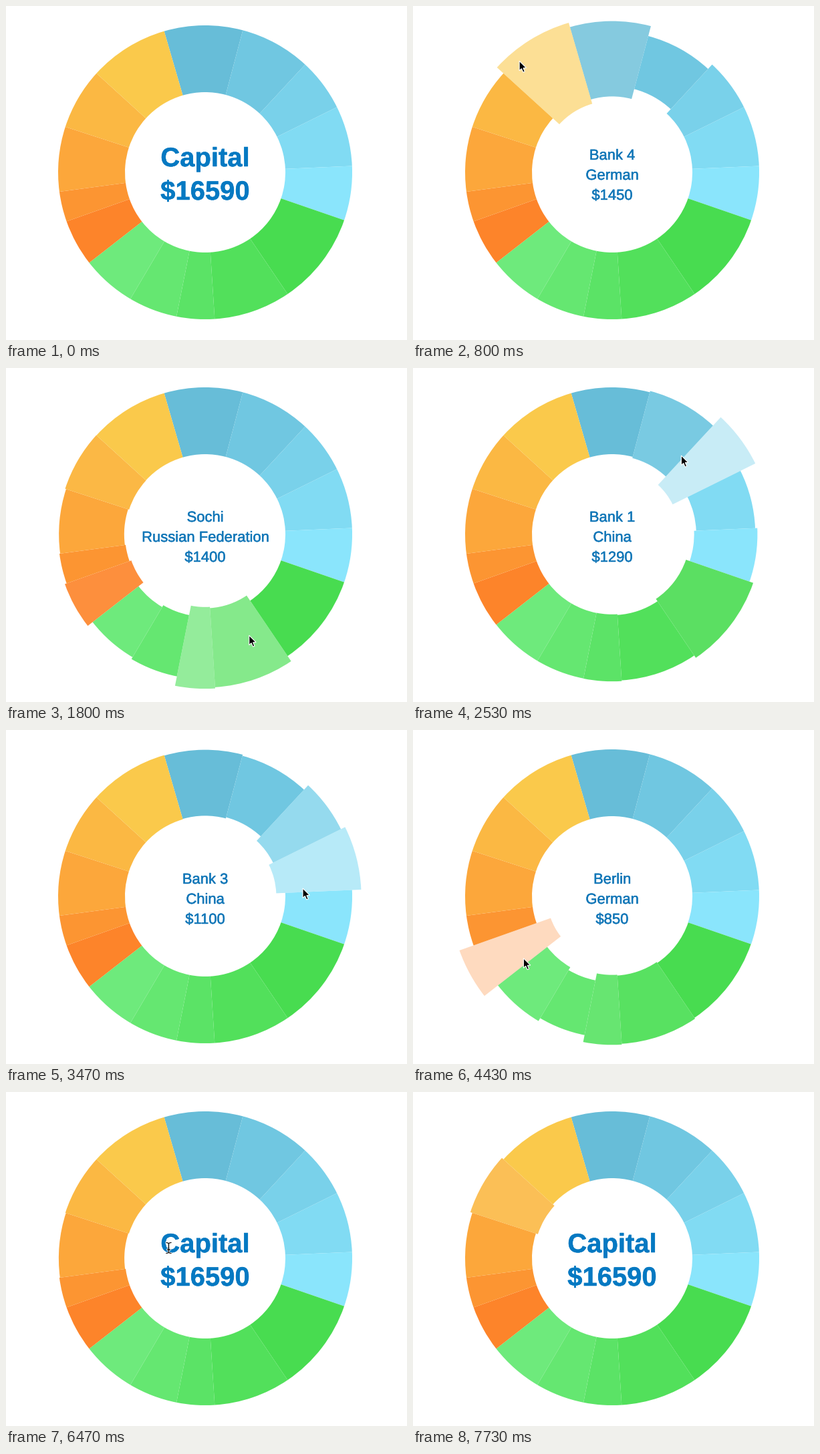
Recreate the animation shown at these times as a matplotlib script. Size 600 px wide and 500 px high, loop 7770 ms.

```python
import numpy as np
import matplotlib.pyplot as plt
from matplotlib.animation import FuncAnimation
from matplotlib.colors import to_rgb
from matplotlib.patches import Polygon, Wedge
from matplotlib.patheffects import withStroke

W, H = 600, 500
CX, CY = 298, 249
INNER, OUTER = 120, 220
GROW, FADE, TWEEN_MS = 18.5, 0.58, 1200
LOOP_MS, STEP_MS = 7770, 30
START_ANGLE = -16.2
PX = 0.72  # points per pixel at 100 dpi

# country, cities (banks fill the rest), first and last colour, values
GROUPS = [
    ("China", ["Beijing"], "#67bdd8", "#8ae5fc", [1430, 1290, 960, 1100, 990]),
    ("Russian Federation", ["Moscow", "Sochi"], "#48dc50", "#6eea7c",
     [1700, 1400, 690, 890, 990]),
    ("German", ["Berlin"], "#fd842a", "#fac94b", [850, 550, 1180, 1120, 1450]),
]

# Pointer on its way round the ring: clockwise angle from the top, and radius
ANGLE_KEYS = [
    (270, 56), (614, 14.8), (724, -16.2), (790, -39.8), (1010, -48),
    (1460, -128), (1600, -149.5), (1646, -168.8), (1761, -183.8),
    (1800, -203.2), (1960, -208), (2520, -318), (2940, -350), (3392, -296.4),
    (3460, -274.7), (4090, -168.8), (4230, -149.5), (4304, -128),
    (4430, -124.7), (4980, -110), (5850, -82), (7390, -62), (7430, -75),
]
RADIUS_KEYS = [
    (270, 372), (430, 240), (614, 180), (790, 217), (1010, 180), (1800, 165),
    (3460, 146.5), (4430, 162), (5850, 165), (6000, 60), (7120, 52),
    (7390, 242), (7430, 335),
]


def build_slices():
    slices = []
    for country, cities, first, last, values in GROUPS:
        first, last = np.array(to_rgb(first)), np.array(to_rgb(last))
        for i, value in enumerate(values):
            name = cities[i] if i < len(cities) else f"Bank {i}"
            color = first + (last - first) * i / (len(values) - 1)
            slices.append((name, country, value, color))
    return slices


SLICES = build_slices()
VALUES = [s[2] for s in SLICES]
TOTAL = sum(VALUES)
EDGES = START_ANGLE + 360 * np.cumsum([0] + VALUES) / TOTAL


def pointer(t):
    return np.interp(t, *zip(*ANGLE_KEYS)), np.interp(t, *zip(*RADIUS_KEYS))


def hovered(t):
    angle, radius = pointer(t)
    if not 105 < radius < 242:
        return None
    turned = (angle - START_ANGLE) % 360 + START_ANGLE
    return int(np.searchsorted(EDGES, turned, side="right")) - 1


def elastic(u):
    if u >= 1:
        return 1.0
    return 1 - 2 ** (-10 * u) * np.cos(2 * np.pi * u / 0.3)


def growth(tweens, t):
    for start, begin, end in reversed(tweens):
        if start <= t:
            return begin + (end - begin) * elastic((t - start) / TWEEN_MS)
    return 0.0


def build_tweens():
    tweens = [[] for _ in SLICES]
    current = None
    for t in range(270, LOOP_MS):
        target = hovered(t)
        if target == current:
            continue
        for index, end in ((current, 0), (target, GROW)):
            if index is not None:
                tweens[index].append((t, growth(tweens[index], t), end))
        current = target
    return tweens


TWEENS = build_tweens()

fig = plt.figure(figsize=(W / 100, H / 100), dpi=100, facecolor="white")
ax = fig.add_axes([0, 0, 1, 1])
ax.set_xlim(0, W)
ax.set_ylim(H, 0)
ax.axis("off")

wedges = []
for i, (_, _, _, color) in enumerate(SLICES):
    wedge = Wedge((CX, CY), OUTER, EDGES[i] - 90, EDGES[i + 1] - 90,
                  width=OUTER - INNER, facecolor=color, linewidth=0)
    wedges.append(ax.add_patch(wedge))


def label(y, size, color, weight="normal", text=""):
    return ax.text(CX, y, text, fontsize=size * PX, color=color, weight=weight,
                   family="Liberation Sans", ha="center", va="baseline",
                   parse_math=False,
                   path_effects=[withStroke(linewidth=0.35, foreground=color)])


title = [label(240, 40, "#0579c2", "bold", "Capital"),
         label(290, 40, "#0579c2", "bold", f"${TOTAL}")]
details = [label(y, 22, "#1277b8") for y in (230, 260, 290)]

ARROW = np.array([(0, 0), (0, 14.5), (3.3, 11.5), (5.7, 17), (8.2, 15.9),
                  (5.9, 10.6), (10.4, 10.4)])
arrow = ax.add_patch(Polygon(ARROW, facecolor="black", edgecolor="white",
                             linewidth=0.8, zorder=5))


def ibeam():
    gap = [(np.nan, np.nan)]
    hook = np.array([(3.5, 8), (1, 7.5), (0, 6), (0, 0)])
    parts = [(-2, 2.5), (2, 2.5)]
    for sx in (-1, 1):
        for sy in (-1, 1):
            parts += gap + [tuple(p) for p in hook * (sx, sy)]
    return np.array(parts)


BEAM = ibeam()
beam = [ax.plot([], [], color=color, linewidth=width, zorder=5)[0]
        for color, width in (("white", 2.0), ("#1a1a1a", 0.9))]


def draw_pointer(t):
    angle, radius = pointer(t)
    x = CX + radius * np.sin(np.radians(angle))
    y = CY - radius * np.cos(np.radians(angle))
    over_title = hovered(t) is None and abs(x - CX) < 67 and 205 < y < 297
    arrow.set_visible(not over_title)
    arrow.set_xy(ARROW + (x, y))
    for line in beam:
        line.set_visible(over_title)
        line.set_data(BEAM[:, 0] + x, BEAM[:, 1] + y)


def draw(frame):
    t = frame * STEP_MS + STEP_MS / 3
    for wedge, tweens in zip(wedges, TWEENS):
        d = growth(tweens, t)
        wedge.set_radius(OUTER + d)
        wedge.set_width(OUTER - INNER + 2 * d)
        wedge.set_alpha(float(np.clip(1 - FADE * d / GROW, 0, 1)))

    index = hovered(t)
    for text in title:
        text.set_visible(index is None)
    lines = ("", "", "")
    if index is not None:
        name, country, value, _ = SLICES[index]
        lines = (name, country, f"${value}")
    for text, line in zip(details, lines):
        text.set_text(line)

    draw_pointer(t)
    return [*wedges, *title, *details, arrow, *beam]


anim = FuncAnimation(fig, draw, frames=LOOP_MS // STEP_MS, interval=STEP_MS,
                     repeat=True, repeat_delay=0, blit=False)
plt.show()
```
